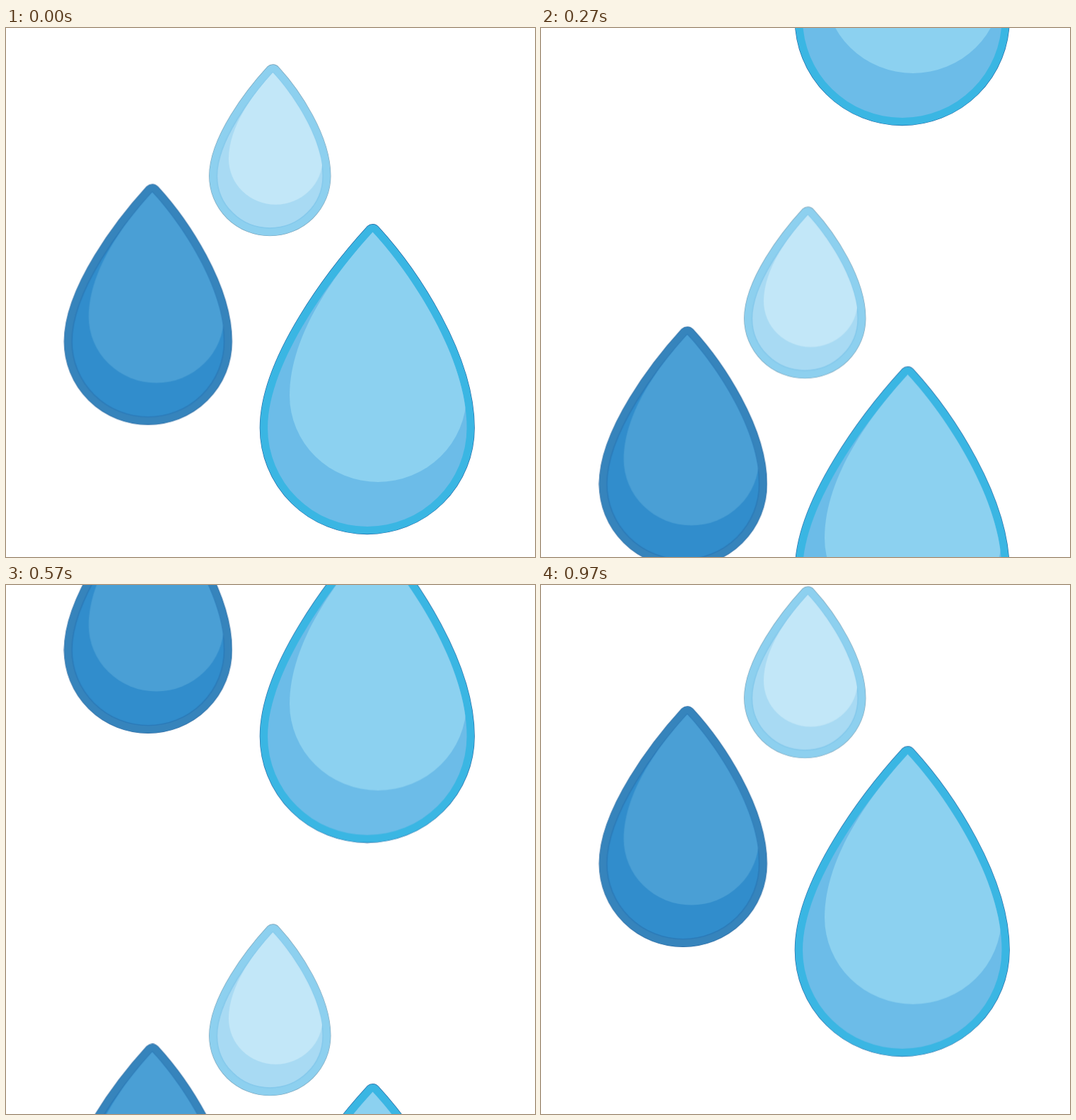
Write an HTML page that moves like this. It is 748x748 px and loops after 1.01 s.

```html
<!DOCTYPE html>
<html lang="en">
<head>
<meta charset="utf-8">
<title>Falling drops</title>
<style>
  html, body { margin: 0; width: 100%; height: 100%; overflow: hidden; background: #fff; }
  svg { display: block; width: 100%; height: 100%; }
  path { vector-effect: non-scaling-stroke; stroke-linejoin: round; }
</style>
</head>
<body>
<svg viewBox="0 0 748 748">
  <defs>
    <!-- drop outline and its shine, both measured from the tip -->
    <path id="body" d="M0 0C-53 58 -148.5 182 -148.5 277A140.75 139.5 0 0 0 133 277C133 177.5 55 60 0 0Z"/>
    <path id="shine" d="M0 0C-50 54 -117.5 144 -117.5 231A125 122.5 0 0 0 132.5 231C132.5 160 58 60 0 0Z"/>
    <clipPath id="inside"><use href="#body"/></clipPath>
  </defs>
  <g id="rain"></g>
</svg>
<script>
const STEP = 25.18;    // fall per step
const PERIOD = 779.5;  // distance between repeats
const LOOP = 1010;
const COUNT = 30;
const RIM = 21.4;
const EDGE = 22.6;

const drops = [
  { x: 377.3, y: 62.6, sx: 0.532, sy: 0.529, edge: '#6f9bb3', rim: '#8dd0ef', fill: '#a8daf3', line: '#84c9ec', shine: '#c2e7f8' },
  { x: 206.8, y: 231.8, sx: 0.765, sy: 0.764, edge: '#22609a', rim: '#3684bc', fill: '#318dcc', line: '#2b7ab8', shine: '#4a9fd5' },
  { x: 518.5, y: 288.4, sx: 1, sy: 1, edge: '#1d629e', rim: '#3ab6e3', fill: '#6cbce8', line: 'none', shine: '#8cd1f0' }
];

const outline = document.getElementById('body').getAttribute('d');
const gloss = document.getElementById('shine').getAttribute('d');

const stroke = (color, width) =>
  `<path d="${outline}" fill="none" stroke="${color}" stroke-width="${width}"/>`;

const drawDrop = d => `
  <g transform="translate(${d.x} ${d.y}) scale(${d.sx} ${d.sy})">
    ${stroke(d.edge, EDGE)}
    ${stroke(d.rim, RIM)}
    <path d="${outline}" fill="${d.fill}" stroke="${d.line}" stroke-width="1.4"/>
    <path d="${gloss}" fill="${d.shine}" clip-path="url(#inside)"/>
  </g>`;

const group = drops.map(drawDrop).join('');
const rain = document.getElementById('rain');
rain.innerHTML = `<g>${group}</g><g transform="translate(0 ${-PERIOD})">${group}</g>`;

// three steps every 100 ms: 30, 40 and 30 ms long
const startOf = n => Math.floor(n / 3) * 100 + [0, 30, 70][n % 3];
const shift = n => `translate(0px, ${(n * STEP).toFixed(2)}px)`;

const frames = Array.from({ length: COUNT }, (_, n) => ({
  offset: startOf(n) / LOOP,
  transform: shift(n),
  easing: 'step-end'
}));
frames.push({ offset: 1, transform: shift(COUNT - 1) });

rain.animate(frames, { duration: LOOP, iterations: Infinity });
</script>
</body>
</html>
```
